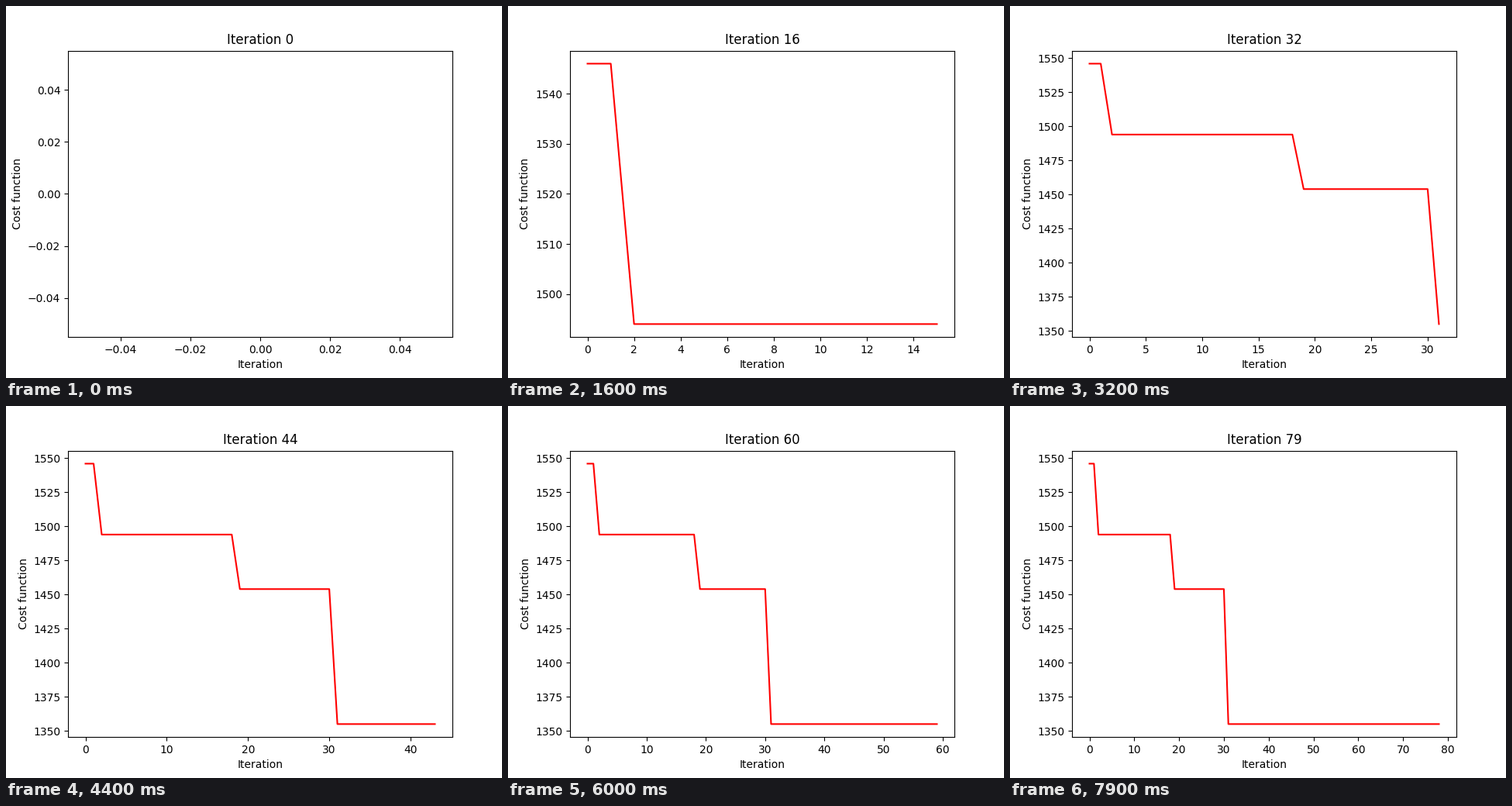
These frames come from a looping animation (640x480 px, 8000 ms). A matplotlib script:

```python
import numpy as np
import matplotlib.pyplot as plt
from matplotlib.animation import FuncAnimation

FRAMES = 80
INTERVAL = 100  # ms

# The best cost drops at a few iterations and holds in between.
steps = np.arange(FRAMES)
drops = [2, 19, 31]
levels = np.array([1546, 1494, 1454, 1355])
cost = levels[np.searchsorted(drops, steps, side="right")]

fig, ax = plt.subplots(figsize=(6.4, 4.8), dpi=100)


def draw(n):
    ax.clear()
    ax.plot(steps[:n], cost[:n], color="red")
    ax.set_title(f"Iteration {n}")
    ax.set_xlabel("Iteration")
    ax.set_ylabel("Cost function")


anim = FuncAnimation(fig, draw, frames=FRAMES, interval=INTERVAL,
                     init_func=lambda: draw(0), repeat=True, repeat_delay=0)
plt.show()
```
